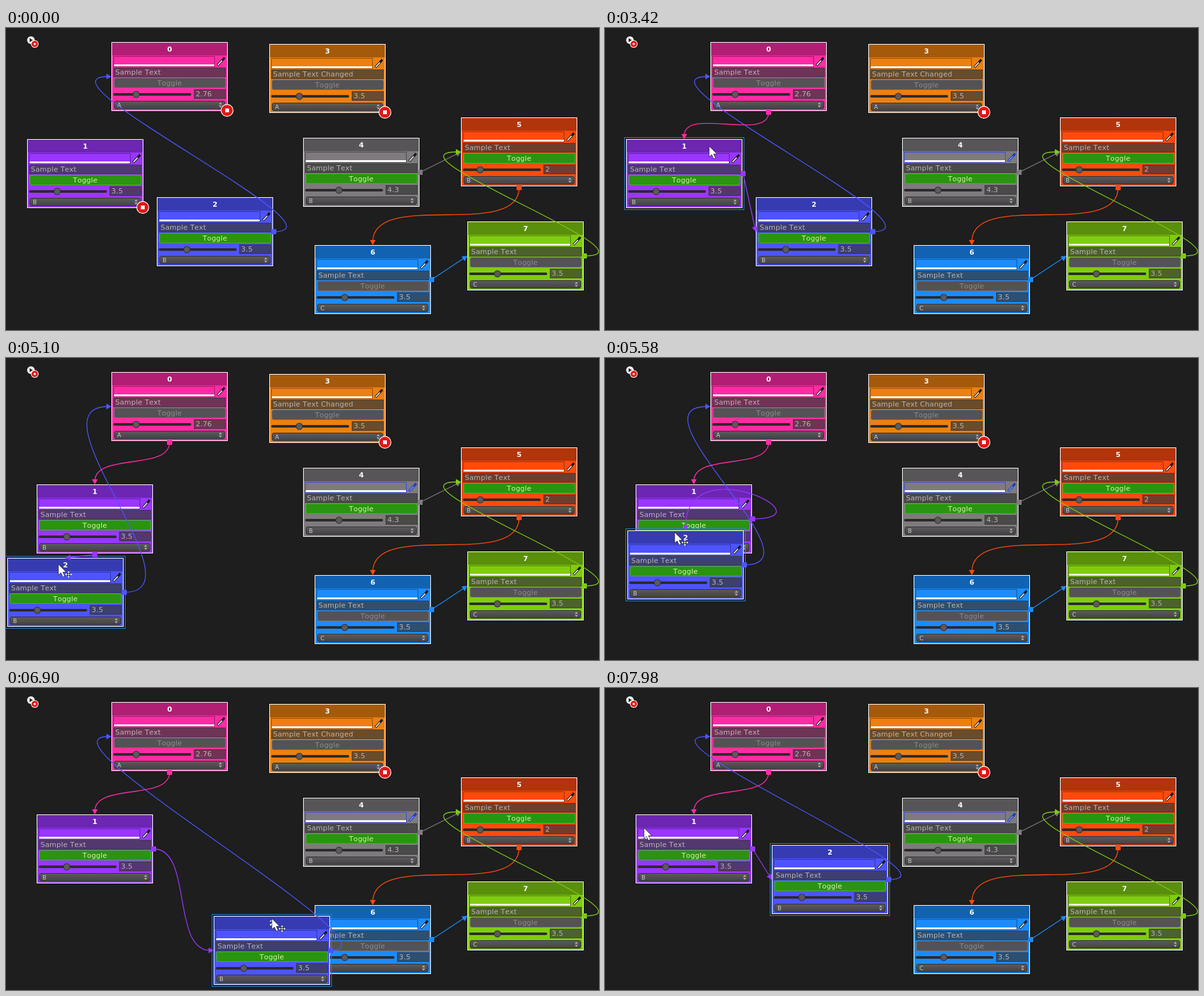
Animation of 928 by 473 pixels, one loop 8000 ms. Source, as an HTML page with a canvas:

```html
<!DOCTYPE html>
<html lang="en">
<head>
<meta charset="utf-8">
<title>Node editor</title>
<style>
html, body { margin: 0; width: 100%; height: 100%; overflow: hidden; background: #1d1e1d; }
canvas { display: block; }
</style>
</head>
<body>
<canvas id="stage" width="928" height="473"></canvas>
<script>
const g = document.getElementById('stage').getContext('2d');
const W = 182, H = 108, LOOP = 8000, STEP = 60;
const FONT = '"DejaVu Sans", sans-serif';

const node = (x, y, color, value, on, option, text = 'Sample Text') =>
  ({ x, y, color, value, on, option, text });
const nodes = [
  node(165, 22, '#ff2ba4', 2.76, false, 'A'),
  node(33, 174, '#9a36ff', 3.5, true, 'B'),
  node(236, 265, '#4d54ff', 3.5, true, 'B'),
  node(412, 25, '#ec8010', 3.5, false, 'A', 'Sample Text Changed'),
  node(465, 172, '#7e7a7e', 4.3, true, 'B'),
  node(712, 140, '#ff4a0e', 2, true, 'B'),
  node(483, 340, '#1a8cff', 3.5, false, 'C'),
  node(722, 303, '#80cc10', 3.5, false, 'C')
];
const drawOrder = [0, 1, 3, 4, 5, 6, 7, 2];

// Turning points of each path: [time, x, y]
const path1 = [[3420, 33, 174], [3600, 20, 229], [3900, 48, 198]];
const path2 = [
  [4540, 236, 265], [4620, 218, 273], [5100, 2, 313], [5580, 35, 270], [5820, 0, 240],
  [6060, 0, 240], [6360, 81, 334], [6420, 83, 335], [6900, 325, 357], [7140, 356, 290],
  [7380, 347, 184], [7680, 261, 246]
];
const pathMouse = [
  [180, 828, 216], [840, 129, 123], [1260, 244, 28], [1860, 136, 183], [2340, 136, 183],
  [2820, 300, 286], [3120, 314, 288], [3360, 163, 185], [3960, 178, 209], [4320, 315, 276],
  [7680, 341, 257], [7980, 61, 219]
];

// Smooth interpolation without overshoot: the speed is zero wherever an axis turns back
function sample(path, t) {
  const last = path.length - 1;
  if (t <= path[0][0]) return path[0].slice(1);
  if (t >= path[last][0]) return path[last].slice(1);
  const i = path.findIndex(p => p[0] > t) - 1;
  const span = path[i + 1][0] - path[i][0], f = (t - path[i][0]) / span;
  return [1, 2].map(axis => {
    const slope = k => k < 0 || k >= last ? 0 :
      (path[k + 1][axis] - path[k][axis]) / (path[k + 1][0] - path[k][0]);
    const speed = k => {
      const a = slope(k - 1), b = slope(k);
      return a * b > 0 ? 2 * a * b / (a + b) : 0;
    };
    const a = path[i][axis], b = path[i + 1][axis];
    return Math.round(a + (b - a) * f * f * (3 - 2 * f) +
      span * f * (1 - f) * (speed(i) * (1 - f) - speed(i + 1) * f));
  });
}

const within = (t, a, b) => t >= a && t < b;

function fill(color, x, y, w, h) {
  g.fillStyle = color;
  g.fillRect(x, y, w, h);
}

function outline(color, x, y, w, h) {
  g.strokeStyle = color;
  g.lineWidth = 1;
  g.strokeRect(x + .5, y + .5, w - 1, h - 1);
}

function disc(color, x, y, r) {
  g.fillStyle = color;
  g.beginPath();
  g.arc(x, y, r, 0, 7);
  g.fill();
}

function box(color, edge, x, y, w, h) {
  g.beginPath();
  g.roundRect(x + .5, y + .5, w - 1, h - 1, 2.5);
  g.fillStyle = color;
  g.fill();
  g.strokeStyle = edge;
  g.lineWidth = 1;
  g.stroke();
}

function line(color, width, ...p) {
  g.strokeStyle = color;
  g.lineWidth = width;
  g.beginPath();
  for (let i = 0; i < p.length; i += 2) g.lineTo(p[i], p[i + 1]);
  g.stroke();
}

function poly(color, ...p) {
  g.fillStyle = color;
  g.beginPath();
  for (let i = 0; i < p.length; i += 2) g.lineTo(p[i], p[i + 1]);
  g.closePath();
  g.fill();
}

function label(text, x, y, color, size = 11, align = 'left', weight = '') {
  g.font = `${weight} ${size}px ${FONT}`;
  g.fontKerning = 'none';
  g.letterSpacing = size === 11 && !weight ? '0.2px' : '0px';
  g.textAlign = align;
  g.fillStyle = color;
  g.fillText(text, x, y);
}

function field(text, x, y, w) {
  fill('rgba(56,56,56,.72)', x, y, w, 15);
  outline('rgba(40,40,40,.4)', x, y, w, 15);
  label(text, x + 3, y + 11, '#b8b4b6');
}

function drawNode(n, i, focused, selected) {
  g.save();
  g.translate(n.x, n.y);
  if (selected) outline('#2a7fd0', -3, -3, W + 6, H + 6);
  fill(n.color, 0, 0, W, H);
  fill('rgba(0,0,0,.3)', 1, 1, W - 2, 20);
  outline('#fff', 0, 0, W, H);
  label(i, 91, 15, '#fff', 11, 'center', 'bold');

  // Colour field and picker
  outline(focused ? '#2f50d8' : 'rgba(0,0,0,.4)', 3, 22, 159, 17);
  fill('#fff', 4, 35, 157, 3);
  const ink = focused ? '#1c3cc0' : '#1a1a1a';
  line(ink, 3.5, 166, 36.5, 173, 29);
  line(focused ? '#7c94ff' : '#fff', 1.7, 166.5, 36, 174, 28);
  line(ink, 3.5, 173, 29, 177, 24.5);

  field(n.text, 3, 40, 176);
  if (n.on) box('#2a9410', '#45b02a', 4, 56, 175, 16);
  else box('#545254', '#6e6a6c', 4, 56, 175, 16);
  label('Toggle', 91, 68, n.on ? '#d6f5a8' : '#918a8d', 11, 'center');

  // Slider with its value
  g.lineCap = 'round';
  line('#2c2a2c', 4, 5, 82, 123, 82);
  g.lineCap = 'butt';
  const knob = 7.5 + 11.3 * n.value;
  disc('#2e2c2e', knob, 82, 5.5);
  disc('#5c5a5c', knob, 82, 4.5);
  field(n.value, 129, 74, 50);

  // Dropdown
  const shade = g.createLinearGradient(0, 92, 0, 105);
  shade.addColorStop(0, '#5e5c5e');
  shade.addColorStop(1, '#424042');
  box(shade, '#343234', 4, 92, 174, 13);
  label(n.option, 9, 101.5, '#d0d0d0', 9);
  poly('#b4b4b4', 168, 97.5, 173, 97.5, 170.5, 94.5);
  poly('#b4b4b4', 168, 99.5, 173, 99.5, 170.5, 102.5);
  g.restore();
}

function drawStop(n) {
  const x = n.x + 181, y = n.y + 107;
  disc('#fff', x, y, 10);
  disc('#e61414', x, y, 8.8);
  fill('#fff', x - 3, y - 3, 6, 6);
}

// Ports sit on the facing sides; close nodes get a straight line, others a curve
function drawLink(from, to) {
  const dx = to.x - from.x, dy = to.y - from.y;
  const beside = dx > W;
  const down = !beside && dy > H;
  const top = !beside && dy > 0;
  const sx = from.x + (down ? 91 : 183), sy = from.y + (down ? 110 : 54);
  const ex = to.x + (top ? 91 : 0), ey = to.y + (top ? 0 : 54);
  const dist = Math.hypot(ex - sx, ey - sy);
  const forward = down ? ey > sy : ex > sx;
  let angle = top ? Math.PI / 2 : 0;
  fill(from.color, sx - 4, sy - 4, 8, 8);
  if (forward && dist < 125) {
    angle = Math.atan2(ey - sy, ex - sx);
    line(from.color, 1.3, sx, sy, ex, ey);
  } else {
    const d = forward ? dist / 3 : 125;
    const tx = ex - (top ? 0 : 5), ty = ey - (top ? 5 : 0);
    g.strokeStyle = from.color;
    g.lineWidth = 1.3;
    g.beginPath();
    g.moveTo(sx, sy);
    g.bezierCurveTo(sx + (down ? 0 : d), sy + (down ? d : 0),
      tx - (top ? 0 : d), ty - (top ? d : 0), tx, ty);
    g.stroke();
  }
  g.save();
  g.translate(ex, ey);
  g.rotate(angle);
  poly(from.color, 0, 0, -8, -4.5, -8, 4.5);
  g.restore();
}

function drawCursor(x, y, moving) {
  g.save();
  g.translate(x, y);
  const shape = [0, 0, 0, 17, 4, 13.5, 7, 20, 10, 18.5, 7, 12.5, 12, 12];
  poly('#fff', ...shape);
  line('#222', .8, ...shape, 0, 0);
  if (moving) {
    g.translate(16, 16);
    for (const [color, width, r] of [['#000', 3, 5], ['#fff', 1, 4]]) {
      line(color, width, -r, 0, r, 0);
      line(color, width, 0, -r, 0, r);
    }
    for (let i = 0; i < 4; i++) {
      poly('#fff', 5.5, 0, 3, -2, 3, 2);
      g.rotate(Math.PI / 2);
    }
  }
  g.restore();
}

function drawRootIcon() {
  disc('#eee', 39, 19, 6);
  poly('#222', 37, 16, 37, 22, 42, 19);
  disc('#fff', 45, 25, 6);
  disc('#e61414', 45, 25, 5);
  fill('#fff', 43.5, 23.5, 3, 3);
}

function draw(t) {
  const [n0, n1, n2, n3, n4, n5, n6, n7] = nodes;
  [n1.x, n1.y] = sample(path1, t);
  [n2.x, n2.y] = sample(path2, t);

  // A dragged node trails the pointer by one step
  const drag1 = within(t, 3480, 3960), drag2 = within(t, 4440, 7680);
  let [cx, cy] = sample(pathMouse, t);
  if (drag1 || drag2) {
    [cx, cy] = sample(drag1 ? path1 : path2, t + STEP);
    cx += drag1 ? 130 : 79;
    cy += 11;
  }

  const selected = {
    1: within(t, 1740, 1980) || within(t, 3360, 4380),
    2: within(t, 2820, 3000) || t >= 4380
  };
  const linked0 = t >= 1980, linked1 = t >= 3000;

  fill('#1d1e1d', 0, 0, 928, 473);
  drawRootIcon();
  for (const i of drawOrder) drawNode(nodes[i], i, i === 4 && t >= 1260, selected[i]);

  const links = [[n2, n0], [n4, n5], [n5, n6], [n6, n7], [n7, n5]];
  if (linked0) links.push([n0, n1]);
  if (linked1) links.push([n1, n2]);
  for (const [a, b] of links) drawLink(a, b);

  if (within(t, 1320, 1980)) line(n0.color, 1.3, n0.x + 91, n0.y + 110, cx, cy);
  if (within(t, 2400, 3000)) line(n1.color, 1.3, n1.x + 183, n1.y + 54, cx, cy);

  if (!linked0) drawStop(n0);
  if (!linked1) drawStop(n1);
  drawStop(n3);
  if (t >= 180) drawCursor(cx, cy, drag1 || drag2);
}

const start = performance.now();
function tick() {
  const t = (performance.now() - start) % LOOP;
  draw(Math.floor(t / STEP) * STEP);
  requestAnimationFrame(tick);
}
tick();
</script>
</body>
</html>
```
